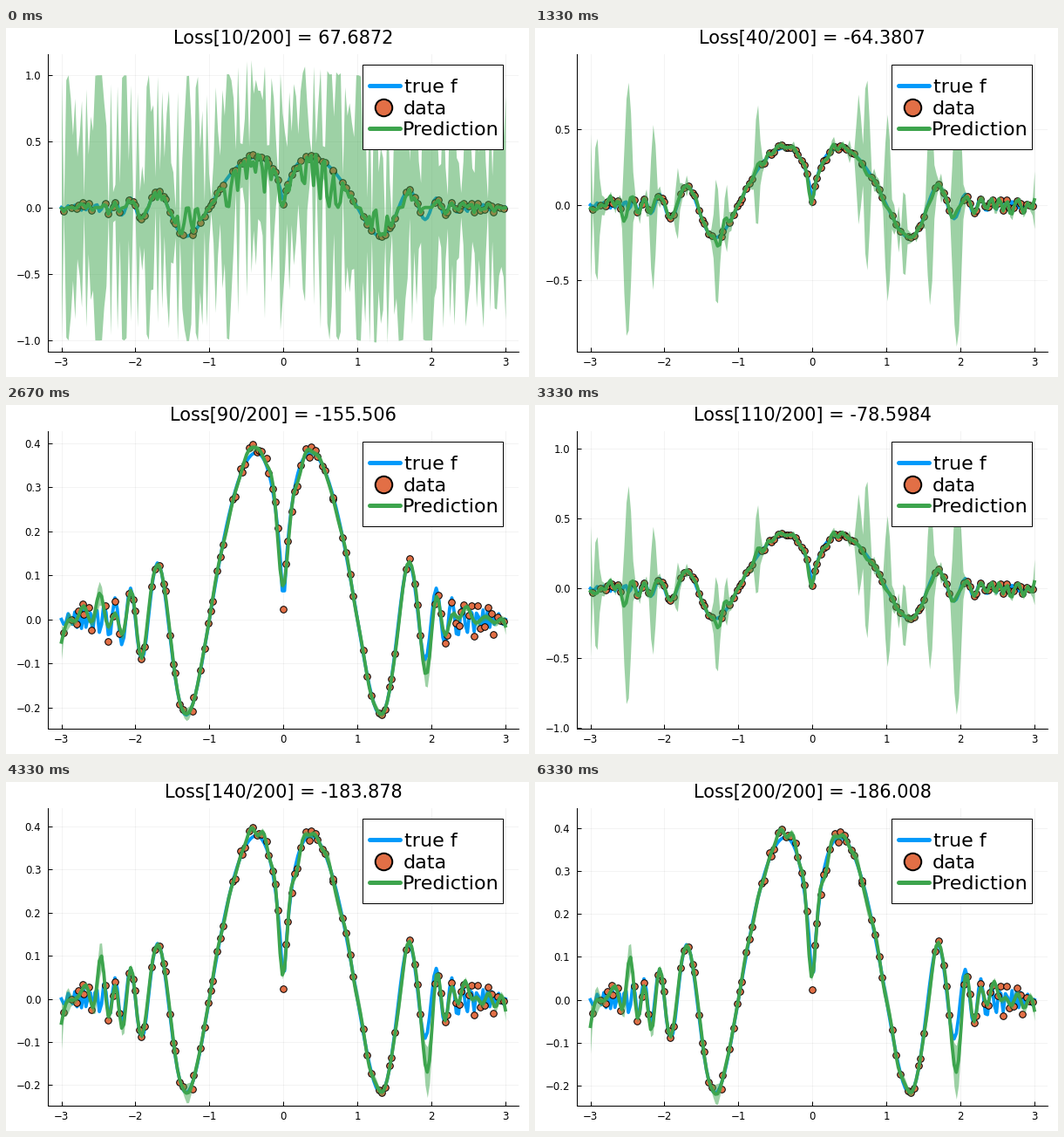
Write a matplotlib script that moves like this. It is 600x400 px and loops after 6660 ms.

```python
import numpy as np
import matplotlib.pyplot as plt
from matplotlib.animation import FuncAnimation
from matplotlib.patches import Rectangle

W, H, DPI = 600, 400, 100
PX = 72 / DPI  # points per pixel
BLUE, ORANGE, GREEN = "#009AFA", "#E26F46", "#3DA44D"
TOP, BOTTOM, RIGHT = 30.3, 370.9, 588.2
ROUNDS = 20

plt.rcParams.update({
    "font.family": "DejaVu Sans",
    "axes.linewidth": 1 * PX,
    "axes.spines.top": False,
    "axes.spines.right": False,
    "axes.axisbelow": True,
    "xtick.direction": "in", "ytick.direction": "in",
    "xtick.major.size": 5 * PX, "ytick.major.size": 5 * PX,
    "xtick.major.width": 1 * PX, "ytick.major.width": 1 * PX,
    "xtick.major.pad": 6 * PX, "ytick.major.pad": 8 * PX,
    "xtick.labelsize": 11.8 * PX, "ytick.labelsize": 11.8 * PX,
})

NOISE = 0.01
SPACING = 0.045
GRID = np.linspace(-3, 3, 200)

# Wide stretches without samples; the ends of each are samples.
GAPS = [(-2.97, -2.86), (-2.59, -2.41), (-2.22, -2.09), (-1.88, -1.78),
        (-1.36, -1.23), (-1.22, -1.12), (-.81, -.69), (.56, .67), (.67, .80),
        (.94, 1.08), (1.19, 1.29), (1.51, 1.66), (1.85, 2.05)]

# Key rounds of the training: iteration, loss, length scale, lower and upper y.
KEYS = np.array([
    (10, 67.6872, .018, -1.087, 1.154),
    (30, -112.123, .068, -.939, .946),
    (70, 78.8461, .016, -1.073, 1.153),
    (80, -10.6429, .040, -1.073, 1.153),
    (90, -155.506, .130, -.248, .4267),
    (100, -41.3175, .050, -1.04, 1.14),
    (110, -78.5984, .058, -1.0044, 1.1247),
    (140, -183.878, .107, -.2475, .4418),
    (200, -186.008, .105, -.2467, .446),
])


def true_f(x):
    a = np.abs(x)
    return np.sinc(a ** a)


def make_data(seed=4):
    """Noisy samples of the curve, roughly even between the gaps."""
    rng = np.random.default_rng(seed)
    edges = [-2.97, *(e for gap in GAPS for e in gap)][1:] + [2.98]
    xs = [np.array(edges)]
    for start, end in zip(edges[1::2], edges[2::2]):
        count = int(round((end - start) / SPACING))
        inner = start + (end - start) * np.arange(1, count) / max(count, 1)
        xs.append(inner + rng.uniform(-.4, .4, len(inner)) * SPACING)
    x = np.sort(np.concatenate(xs))
    x = x[np.abs(x) > .03]
    y = true_f(x) + rng.normal(0, NOISE, len(x))
    return np.append(x, 0), np.append(y, .023)


X, Y = make_data()


def posterior(ell, amp):
    """Mean and standard deviation of a Gaussian process on the grid."""
    def kernel(a, b):
        return amp ** 2 * np.exp(-0.5 * ((a[:, None] - b) / ell) ** 2)

    cov = kernel(X, X) + NOISE ** 2 * np.eye(len(X))
    cross = kernel(GRID, X)
    weights = np.linalg.solve(cov, cross.T)
    var = amp ** 2 - np.sum(cross * weights.T, axis=1)
    return weights.T @ Y, np.sqrt(np.maximum(var, 0))


def training_state(iteration):
    at, *columns = KEYS.T
    return [np.interp(iteration, at, col) for col in columns]


def tick_step(span):
    if span > 1.95:
        return .5
    if span > 1.2:
        return .25
    return .2 if span > .8 else .1


def tick_label(value, digits):
    return f"{value:.{digits}f}".replace("-", "\u2212")


fig = plt.figure(figsize=(W / DPI, H / DPI), dpi=DPI, facecolor="white")
ax = fig.add_axes([0, 0, 1, 1])
title = fig.text(0, 1 - 18 / H, "", ha="center", va="baseline",
                 fontsize=20.9 * PX)

# The legend lives on an overlay measured in pixels.
over = fig.add_axes([0, 0, 1, 1], zorder=5)
over.set(xlim=(0, W), ylim=(H, 0))
over.axis("off")
box = over.add_patch(Rectangle((0, 0), 1, 1, fc="white", ec="black",
                               lw=1 * PX))
for text, x, y in (("true f", 457, 66.1), ("data", 455.8, 90.5),
                   ("Prediction", 455, 114.9)):
    over.text(x, y + 8.2, text, fontsize=22.3 * PX, va="baseline")
for color, y in ((BLUE, 66.1), (GREEN, 114.9)):
    over.plot([416.5, 451.5], [y, y], color=color, lw=5 * PX,
              solid_capstyle="round")
over.plot([433.3], [90.5], "o", ms=19.5 * PX, mfc=ORANGE, mec="black",
          mew=2 * PX)


def draw(i):
    iteration = 10 * (i + 1)
    loss, ell, lo, hi = training_state(iteration)
    amp = np.interp(ell, [.065, .105], [1, .4])
    mean, sd = posterior(ell, amp)
    step = tick_step(hi - lo)
    digits = 2 if step == .25 else 1
    left = 56.1 if digits == 2 else 48.3

    ax.clear()
    ax.set_position([left / W, 1 - BOTTOM / H, (RIGHT - left) / W,
                     (BOTTOM - TOP) / H])
    ax.grid(color="black", alpha=0.06, lw=0.8 * PX)
    ax.plot(GRID, true_f(GRID), color=BLUE, lw=3.8 * PX, zorder=2)
    ax.plot(X, Y, "o", ms=7.6 * PX, mfc=ORANGE, mec="black", mew=1 * PX,
            zorder=3)
    ax.fill_between(GRID, mean - sd, mean + sd, color=GREEN, alpha=0.5, lw=0,
                    zorder=4)
    ax.plot(GRID, mean, color=GREEN, lw=3.8 * PX, zorder=5)

    first, last = int(np.ceil(lo / step)), int(np.floor(hi / step))
    ticks = [k * step for k in range(first, last + 1)]
    ax.set_xticks(range(-3, 4))
    ax.set_yticks(ticks, [tick_label(t, digits) for t in ticks])
    ax.set(xlim=(-3.18, 3.18), ylim=(lo, hi))

    title.set_text(f"Loss[{iteration}/200] = {loss:.6g}")
    title.set_x((left + RIGHT) / 2 / W)
    box_left = 410.4 if digits == 2 else 409.4
    box.set_bounds(box_left, 41.6, 569.6 - box_left, 97.3)
    return []


anim = FuncAnimation(fig, draw, frames=ROUNDS, init_func=lambda: draw(0),
                     interval=333, repeat=True, repeat_delay=0, blit=False)
plt.show()
```
